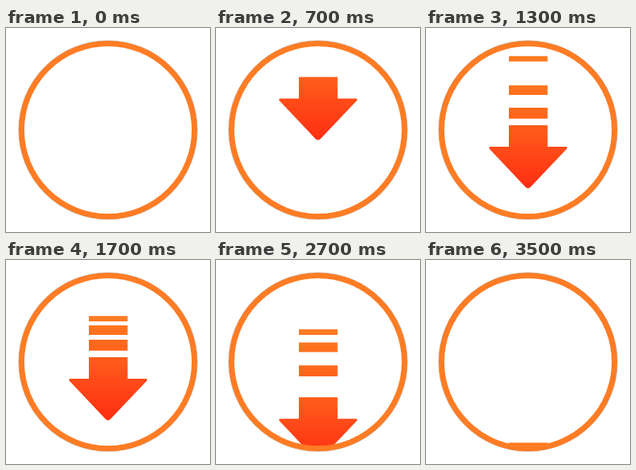
An HTML page for the animation above (3600 ms loop, 256 px wide and 256 px high).

```html
<!DOCTYPE html>
<html lang="en">
<head>
<meta charset="utf-8">
<title>Download arrow</title>
<style>
  html, body { margin: 0; width: 100%; height: 100%; overflow: hidden; background: #fff; }
  svg { display: block; width: 100%; height: 100%; }
</style>
</head>
<body>
<svg viewBox="0 0 256 256">
  <defs>
    <linearGradient id="heat" gradientUnits="userSpaceOnUse" x1="0" y1="70" x2="0" y2="202">
      <stop offset="0" stop-color="#ff7d22"/>
      <stop offset="1" stop-color="#ff2d12"/>
    </linearGradient>
    <clipPath id="hole"><circle cx="128" cy="128" r="107"/></clipPath>
  </defs>
  <g clip-path="url(#hole)" fill="url(#heat)">
    <path id="arrow" d="M104 122H152.6V149H175.3Q178.6 149 176.3 152L131 199.7Q128 202.6 125 199.7L79.9 152Q77.8 149 81 149H104Z"/>
    <path id="low" d="M104 100H152.6V113.8H104Z"/>
    <path id="mid" d="M104 82H152.6V94H104Z"/>
    <path id="top" d="M104 70.2H152.6V77.1H104Z"/>
  </g>
  <circle cx="128" cy="128" r="112.1" fill="none" stroke="#444" stroke-opacity=".6" stroke-width=".6"/>
  <circle cx="128" cy="128" r="108.5" fill="none" stroke="#ff7c24" stroke-width="7"/>
</svg>
<script>
  const LOOP = 3600, STEP = 100, LEAVE = 2400;

  // land: time of arrival; fall and exit: [top speed per step, steps to reach it]
  const parts = [
    { id: "arrow", land: 1048, fall: [38.5, 3.85], exit: [39, 3.5] },
    { id: "low", land: 1265, fall: [32, 4], exit: [30, 4.2] },
    { id: "mid", land: 1482, fall: [27, 4.5], exit: [24, 5] },
    { id: "top", land: 1700, fall: [21.9, 5], exit: [18.7, 5] }
  ];
  for (const p of parts) p.el = document.getElementById(p.id);

  // Constant acceleration, then constant speed
  function travel(ms, [speed, ramp]) {
    const n = Math.max(0, ms / STEP);
    return n < ramp ? speed * n * n / (2 * ramp) : speed * (n - ramp / 2);
  }

  const start = performance.now();

  function draw(now) {
    const elapsed = Math.max(0, now - start) % LOOP;
    const t = Math.floor(elapsed / STEP) * STEP;
    for (const p of parts) {
      const y = travel(t - LEAVE, p.exit) - travel(p.land - t, p.fall);
      p.el.setAttribute("transform", `translate(0 ${y.toFixed(2)})`);
    }
    requestAnimationFrame(draw);
  }
  draw(start);
</script>
</body>
</html>
```
